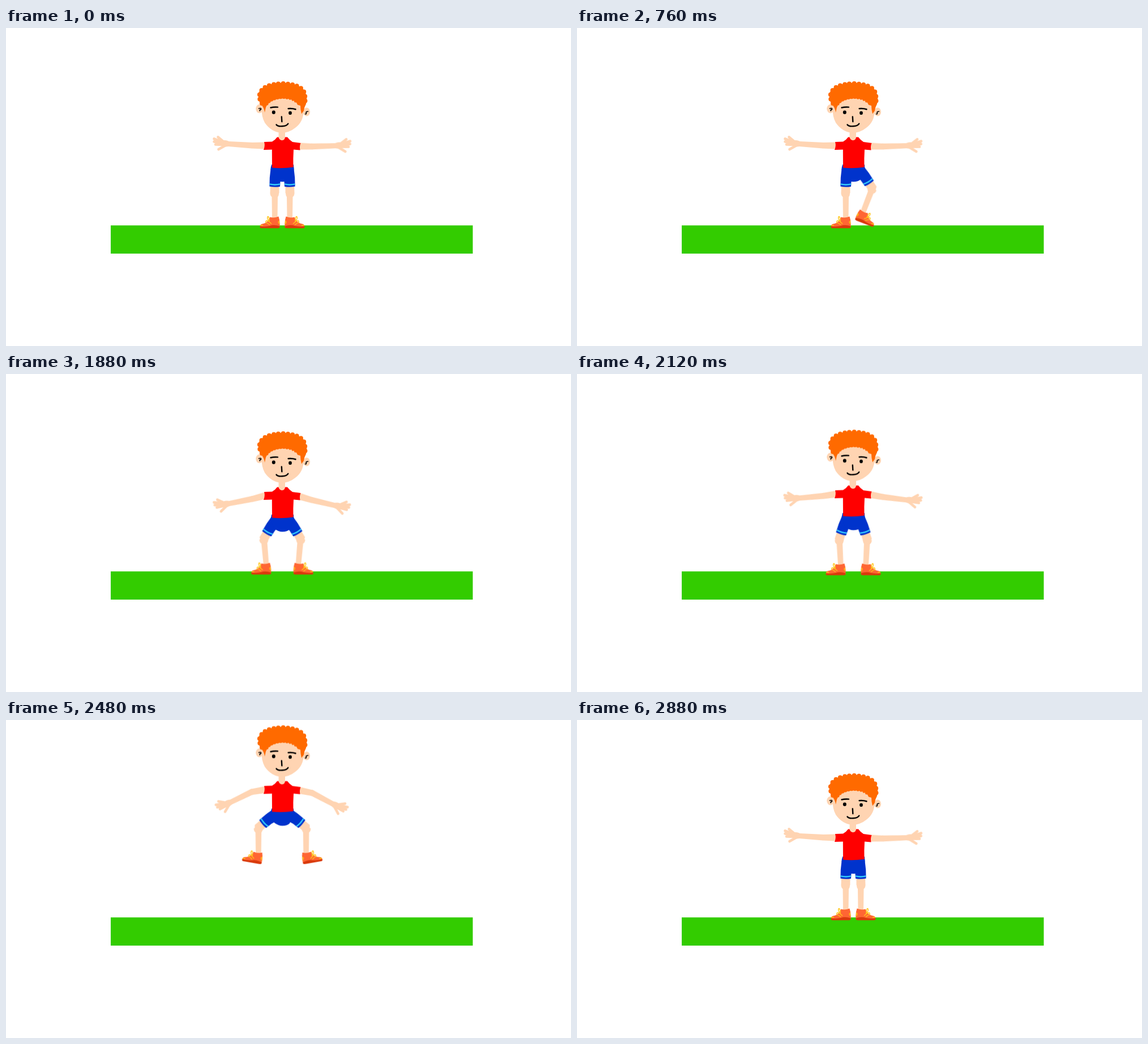
These frames come from a looping animation (998x561 px, 3840 ms). An HTML page without scripts:

```html
<!DOCTYPE html>
<html lang="en">
<head>
<meta charset="utf-8">
<title>Exercise</title>
<style>
html, body { margin: 0; width: 100%; height: 100%; overflow: hidden; background: #fff; }
svg { display: block; width: 100%; height: 100%; }
.skin { fill: #ffd4b2; }
.ink { fill: none; stroke: #000; stroke-width: 2.4; stroke-linecap: round; stroke-linejoin: round; }
.fingers { fill: none; stroke: #ffd4b2; stroke-width: 4.6; stroke-linecap: round; }

.body, .arm, .fore, .thigh, .shin, .foot { animation: 3840ms linear infinite; }
.body { animation-name: body; }
.arm { transform-origin: 458px 208px; animation-name: arm; }
.fore { transform-origin: 434px 207px; animation-name: fore; }
.thigh { transform-origin: 477px 250px; animation-name: thigh, thigh-a; }
.shin { transform-origin: 474.5px 290px; animation-name: shin, shin-a; }
.foot { transform-origin: 475px 333px; animation-name: foot; }
.far .thigh { animation-name: thigh, thigh-b; }
.far .shin { animation-name: shin, shin-b; }

/* squat and jump */
@keyframes body {
  0%, 43.75%, 58.333%, 72.917%, 100% { transform: translateY(0); }
  48.958% { transform: translateY(7px); }
  51.042% { transform: translateY(10px); }
  60.417% { transform: translateY(-26.5px); }
  64.583% { transform: translateY(-85px); }
  68.75% { transform: translateY(-29px); }
  70.833% { transform: translateY(4px); }
}
@keyframes arm {
  0%, 43.75%, 58.333%, 72.917%, 100% { transform: rotate(0deg); }
  48.958% { transform: rotate(-15deg); }
  51.042% { transform: rotate(-21deg); }
  60.417% { transform: rotate(-6deg); }
  64.583% { transform: rotate(-10deg); }
  68.75% { transform: rotate(-14.5deg); }
  70.833% { transform: rotate(-9deg); }
}
@keyframes fore {
  0%, 58.333%, 68.75%, 100% { transform: rotate(0deg); }
  60.417% { transform: rotate(-22deg); }
  64.583% { transform: rotate(-20deg); }
}
@keyframes thigh {
  0%, 43.75%, 58.333%, 72.917%, 100% { transform: rotate(0deg); }
  48.958% { transform: rotate(29deg); }
  51.042% { transform: rotate(39deg); }
  60.417% { transform: rotate(38deg); }
  64.583% { transform: rotate(48deg); }
  68.75% { transform: rotate(32deg); }
  70.833% { transform: rotate(22deg); }
}
@keyframes shin {
  0%, 43.75%, 58.333%, 72.917%, 100% { transform: rotate(0deg); }
  48.958% { transform: rotate(-34deg); }
  51.042% { transform: rotate(-46deg); }
  60.417% { transform: rotate(-37deg); }
  64.583% { transform: rotate(-48deg); }
  68.75% { transform: rotate(-32deg); }
  70.833% { transform: rotate(-25deg); }
}
@keyframes foot {
  0%, 43.75%, 58.333%, 72.917%, 100% { transform: rotate(0deg); }
  48.958% { transform: rotate(5deg); }
  51.042% { transform: rotate(7deg); }
  60.417% { transform: rotate(8deg); }
  64.583% { transform: rotate(10deg); }
  68.75% { transform: rotate(5deg); }
}
/* single leg lifts */
@keyframes thigh-a {
  0%, 29.167%, 43.75%, 100% { rotate: 0deg; }
  32.292%, 36.458% { rotate: 53deg; }
}
@keyframes shin-a {
  0%, 29.167%, 43.75%, 100% { rotate: 0deg; }
  32.292%, 36.458% { rotate: -98deg; }
}
@keyframes thigh-b {
  0%, 14.583%, 29.167%, 100% { rotate: 0deg; }
  19.792% { rotate: 31deg; }
  21.875% { rotate: 45deg; }
}
@keyframes shin-b {
  0%, 14.583%, 29.167%, 100% { rotate: 0deg; }
  19.792% { rotate: -52deg; }
  21.875% { rotate: -76deg; }
}
</style>
</head>
<body>
<svg viewBox="0 0 998 561">
  <defs>
    <path id="upper" class="skin" d="M464 202 L456 201.5 L434 202 Q429 207 434 212.5 L456 213.5 L464 213Z"/>
    <g id="lower">
      <path class="skin" d="M436 202 L394 200 Q384 195 379 202 Q379 208 384 210 L393 209 L434 212.5 Q439 207 436 202Z"/>
      <path class="fingers" d="M386 202 L374.5 192.5 M383 201.5 L367.5 195.5 M382 203.5 L367.5 200.5 M383 206 L370 205.5 M387 207.5 L375.5 214"/>
    </g>
    <path id="calf" class="skin" d="M466.5 291 Q466.5 296 469.5 298 L470 336 H479.5 L480 298 Q482 296 482 291 Q474 284 466.5 291Z"/>
    <g id="shoe">
      <path fill="#ff6633" d="M466.5 333.5 Q473 336 481.5 332.5 Q484.5 341 483.3 352 H450 Q447 349 451 346 Q462 344 465 337Z"/>
      <path fill="#d93a0c" d="M448.7 349.5 Q458 351 466 349 Q474 346.5 483.4 349.5 V352 Q482 353.4 479 353.2 H451 Q448 353 448.7 349.5Z"/>
      <path fill="#ffb31a" d="M482.8 339 Q477.5 342.5 483.5 347Z M450 346.7 Q454 346.5 454.5 349.5 L449 349Z"/>
      <path fill="none" stroke="#ffc61a" stroke-width="1.5" stroke-linecap="round" d="M465 342 Q460 335 462.5 332.5 Q465.5 333 465 342 Q458 337 459 344 M465 342 L468.5 345 M461 344 L465.5 347"/>
    </g>
    <g id="thigh">
      <path class="skin" d="M467 276 H482.5 V291 Q474.5 300 466.5 291Z"/>
      <path fill="#0033cc" d="M468 244 L465.8 264 L465.4 279.5 Q475 281.5 484 279.7 L484.7 268 L489 250Z"/>
      <path fill="none" stroke="#33ccff" stroke-width="2.5" d="M465.6 275.4 Q475 277.5 484.2 275.4"/>
    </g>
  </defs>

  <path fill="#33cc00" d="M185 348.3 H824.5 V398 H185Z"/>

  <g class="body">
    <g class="thigh">
      <g class="shin"><use href="#calf"/><g class="foot"><use href="#shoe"/></g></g>
      <use href="#thigh"/>
    </g>
    <g class="far" transform="matrix(-1 0 0 1 976 0)">
      <g class="thigh">
        <g class="shin"><use href="#calf"/><g class="foot"><use href="#shoe"/></g></g>
        <use href="#thigh"/>
      </g>
    </g>
    <path fill="#0033cc" d="M469 241 L467.5 250 L474 266 Q482 271.5 488 271.3 Q496 271.5 501 267 L508.5 250 L508 241Z"/>

    <g class="arm"><use href="#upper"/><g class="fore"><use href="#lower"/></g></g>
    <g transform="matrix(-1 0 0 1 975 1) rotate(-2 458 208)">
      <g class="arm"><use href="#upper"/><g class="fore"><use href="#lower"/></g></g>
    </g>

    <path fill="#f00" d="M456 201 L470 200.5 Q476 197 479 192.5 H497 Q501 198 506 201 L520.5 203 Q518 209 519.5 215.5 L508 214.5 Q507 230 507.5 245.5 Q488 248.5 470 246.5 L469.8 214.5 L455 215 Q458 208 456 201Z"/>
    <path class="skin" d="M481.5 180 H493 V193 Q492 198.2 487.5 198.2 Q483 198 481.5 193Z"/>

    <ellipse class="skin" cx="447.5" cy="142.5" rx="6.2" ry="7.8"/>
    <ellipse class="skin" cx="531" cy="148" rx="6" ry="7.6"/>
    <path class="skin" d="M451.5 140 Q452 108 488 108 Q526 108 526 146 Q525 166 511 176 Q500 185 486 185 Q468 183 457 167 Q451 156 451.5 140Z"/>

    <g fill="#ff6a00">
      <path d="M447 113 Q455 98 488 96.5 Q520 98 528 112 Q533 122 530 134 Q527 139 526 146 L522 151.5 Q520 144 520 137 L515 135.5 Q512 127 500 125 Q488 123 476 126 Q462 131 459 140 L457 149 Q456 140 449 133 Q444 124 447 113Z"/>
      <path fill="none" stroke="#ff6a00" stroke-width="8" stroke-linecap="round" stroke-dasharray="0 8.2" d="M452 133 Q446 124 448 117 Q453 99 488 98 Q520 99 526.5 113 Q530 124 527.5 135"/>
      <path fill="none" stroke="#ff6a00" stroke-width="5" stroke-linecap="round" stroke-dasharray="0 5.5" d="M461 134 Q468 124 488 122.5 Q508 123 514 132"/>
    </g>

    <path class="ink" d="M467.5 140.5 Q473 139 480 139.6 M498.5 142.2 Q506 141.5 511.5 143.5 M486.8 156.5 L487.3 165.3 M477.5 170.5 Q480 174 488 173.2 Q496 173 498.3 168.7"/>
    <path class="ink" stroke-width="1.5" style="stroke-width:1.6" d="M446.5 142 Q450.5 140.6 450.6 143 Q450.3 144.5 448.3 144.4 V146.3 M533.5 147.3 Q529.5 147.6 530 149.5 Q531.5 152 528.5 151.8"/>
    <ellipse cx="472.8" cy="148.8" rx="3" ry="3.3"/>
    <ellipse cx="502" cy="149.9" rx="2.9" ry="3.1"/>
  </g>
</svg>
</body>
</html>
```
